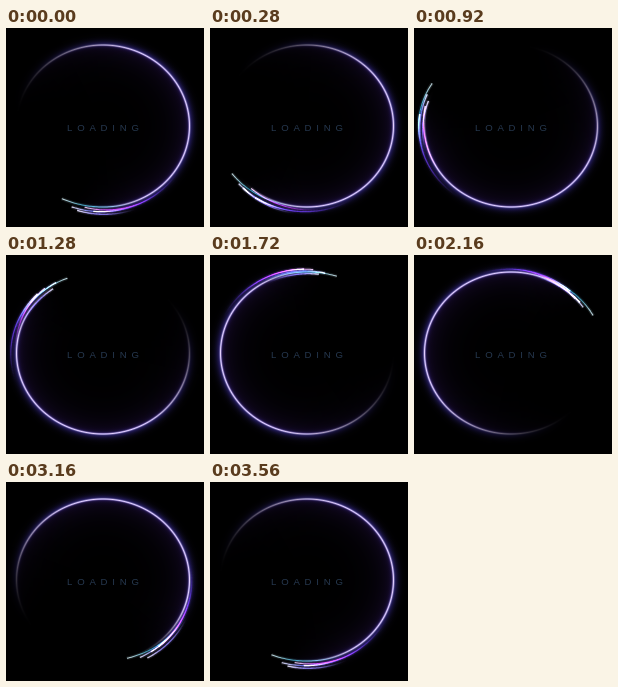
An HTML page with a canvas for the animation above (3.6 s loop, 198 by 199 pixels).

```html
<!DOCTYPE html>
<html lang="en">
<head>
<meta charset="utf-8">
<title>Loading ring</title>
<style>
  html, body { margin: 0; width: 100%; height: 100%; overflow: hidden; background: #000; }
  canvas { display: block; }
</style>
</head>
<body>
<canvas id="stage" width="198" height="199"></canvas>
<script>
const ctx = document.getElementById('stage').getContext('2d');
const W = 198, H = 199;
const CX = 97, CY = 98, R = 86.5, SQUASH = 81 / 86.5;
const LOOP = 3600, STEP = 40, START = 118, REACH = 110;

const rad = deg => deg * Math.PI / 180;
const smooth = (from, to, x) => {
  const u = Math.min(1, Math.max(0, (x - from) / (to - from)));
  return u * u * (3 - 2 * u);
};

// A strand swings around the ring: offset = base + swing * cos(waves * (angle - phase)).
const strands = [
  { lag: 22, length: 65, width: 1.3, color: [85, 45, 190], base: 4, swing: 2, waves: 1, phase: 150 },
  { lag: 16, length: 50, width: 1.1, color: [185, 45, 200], base: 2, swing: 2, waves: 2, phase: 60 },
  { lag: 12, length: 38, width: 1.4, color: [135, 120, 235], base: 3, swing: 5, waves: 1, phase: 75 },
  { lag: 8, length: 45, width: 1.3, color: [95, 100, 225], base: 3, swing: 2.5, waves: 1, phase: 130 },
  { lag: 0, length: 52, width: 1.1, color: [45, 150, 180], base: 3, swing: 3, waves: 2, phase: 0 }
];

// Colour across the ring: a thin pale line, blue haze outside, purple wash inside.
function glowColor(x) {
  const core = Math.exp(-((x / 0.95) ** 2));
  const haze = x > 0 ? Math.exp(-((x / 4.2) ** 1.4)) : Math.exp(x / 1.5);
  const wash = x > 0 ? 0 : Math.exp(x / 14);
  const mix = (c, h, w) => Math.round(c * core + h * haze + w * wash);
  return `rgb(${mix(165, 44, 18)},${mix(165, 34, 8)},${mix(140, 115, 36)})`;
}

const glow = ctx.createRadialGradient(0, 0, 0, 0, 0, REACH);
for (let r = 0; r <= REACH; r += 0.5) glow.addColorStop(r / REACH, glowColor(r - R));

function drawRing(head) {
  const mask = ctx.createConicGradient(rad(head), 0, 0);
  for (let deg = 0; deg <= 360; deg += 5) {
    const behind = 360 - deg;
    const alpha = smooth(5, 60, behind) * (1 - smooth(175, 290, behind));
    mask.addColorStop(deg / 360, `rgba(0,0,0,${alpha})`);
  }
  const cover = (style, mode) => {
    ctx.globalCompositeOperation = mode;
    ctx.fillStyle = style;
    ctx.fillRect(-W, -H, 2 * W, 2 * H);
  };
  cover(glow, 'source-over');
  cover(mask, 'destination-in');
}

function pointOn({ base, swing, waves, phase }, deg) {
  const r = R + base + swing * Math.cos(rad(waves * (deg - phase)));
  return [r * Math.cos(rad(deg)), r * Math.sin(rad(deg))];
}

function drawStrand(strand, head) {
  const { lag, length, width, color } = strand;
  const tip = head - lag;
  ctx.globalCompositeOperation = 'lighter';
  for (let d = length; d > 0; d--) {
    const near = 1 - d / length;
    const white = 0.75 * smooth(0.65, 1, near);
    const rgb = color.map(v => Math.round(v + (255 - v) * white));
    const line = (lineWidth, alpha) => {
      ctx.strokeStyle = `rgba(${rgb},${alpha})`;
      ctx.lineWidth = lineWidth;
      ctx.beginPath();
      ctx.moveTo(...pointOn(strand, tip - d));
      ctx.lineTo(...pointOn(strand, tip - d + 1));
      ctx.stroke();
    };
    const strength = smooth(0, 0.6, near);
    line(width + 2.5, 0.12 * strength);
    line(width, 0.8 * strength);
  }
}

function drawLabel() {
  ctx.font = '9.6px "Liberation Sans", Arial, sans-serif';
  ctx.letterSpacing = '4.8px';
  ctx.fillStyle = '#26384f';
  ctx.fillText('LOADING', 61, 103);
}

function frame(now) {
  const t = Math.floor(now % LOOP / STEP) * STEP;
  const head = START + 360 * t / LOOP;
  ctx.clearRect(0, 0, W, H);
  ctx.save();
  ctx.translate(CX, CY);
  ctx.scale(1, SQUASH);
  drawRing(head);
  strands.forEach(strand => drawStrand(strand, head));
  ctx.restore();
  drawLabel();
}

const begin = performance.now();
function tick() {
  frame(performance.now() - begin);
  requestAnimationFrame(tick);
}
tick();
</script>
</body>
</html>
```
